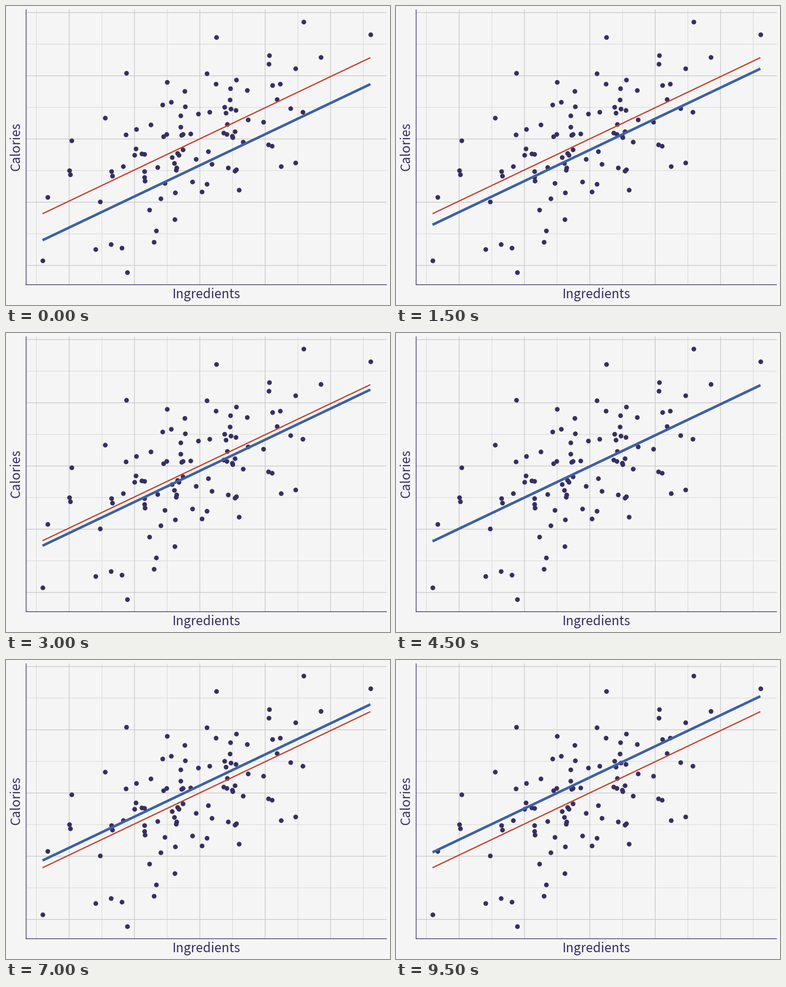
A matplotlib script that plays this animation: 849x660 px, repeating every 10 s.

```python
import matplotlib.pyplot as plt
from matplotlib.animation import FuncAnimation

W, H, DPI = 849, 660, 64
PT = 72 / DPI  # points per pixel

BG, NAVY = "#f5f5f5", "#372f60"
BLUE, RED = "#3d61a4", "#c6432f"
MAJOR, MINOR = "#c8c8c8", "#dedede"
LEFT, RIGHT, TOP, BOTTOM = 44.5, 842, 7.5, 615.3
X0, X1, RISE = 80.8, 805.6, 344.5

LOW_X = [
    (81, 561.5), (92, 422), (145, 296.5), (140, 362.5), (142.3, 371.5),
    (198.5, 536.5), (208.5, 431.5), (219.3, 246.5), (232.3, 526),
    (233, 364.5), (234.8, 374.5), (256, 534), (259, 354), (264.6, 284),
    (266.5, 147.5), (268, 588), (284.3, 328.8), (286.8, 315), (288.2, 272.3),
    (300, 326), (306.5, 326.5), (305.7, 364.5), (305.7, 378), (306.6, 386.3),
    (317.2, 450), (319.6, 261.8), (327, 520.5), (332, 496.3), (334.7, 355.5),
    (341.6, 425), (346.4, 218.2), (348.3, 287.6), (355, 282.8), (351, 390.7),
    (356.5, 167.6), (364.7, 212), (367.4, 334.3), (372.4, 347.3),
    (376.8, 356.5), (375.8, 362), (374, 412), (373.4, 471.3), (379.5, 325.3),
    (382.4, 328.6), (385.6, 241.5), (386.5, 266.5), (388, 285.2),
    (391, 282.7), (391.3, 317), (395, 187.8), (395.8, 221.7),
]
HIGH_X = [
    (408, 281.6), (412.2, 388.4), (419.8, 338.4), (424.7, 238.2),
    (433.3, 410.2), (444, 149), (444.4, 393), (447.2, 321), (450, 234),
    (455.4, 348.8), (464, 172.3), (465.3, 69), (480.8, 280.3), (483.5, 223),
    (485.7, 236.4), (487.6, 282.5), (489, 260.5), (491.4, 356.6),
    (495.4, 206.6), (495.8, 181.6), (496.8, 227.3), (499.8, 287),
    (501.2, 290.3), (506, 276.5), (508.5, 230.2), (509, 162.7), (506, 364),
    (508.7, 361), (515.4, 405.8), (523.7, 299.8), (533.2, 185.6),
    (534.6, 251), (568.8, 255.8), (580.3, 305.5), (588.4, 309.3),
    (581.2, 128), (582.4, 109.2), (588.7, 174.5), (606, 171.8),
    (598.6, 205.6), (607.9, 354.4), (628.8, 225.6), (640, 137.5),
    (640.2, 346), (656.2, 233.7), (658.3, 35), (695.8, 113.3), (805.6, 63.2),
]

# height of the blue line's right end at each step
ENDS = [172.5, 150, 149.6, 138.4, 134, 133.5, 125, 122.5, 120, 115.4,
        111, 109, 109, 107, 98, 97, 95.2, 93, 91.5, 80]

plt.rcParams["font.family"] = "Noto Sans CJK JP"
fig = plt.figure(figsize=(W / DPI, H / DPI), dpi=DPI, facecolor=BG)
ax = fig.add_axes([0, 0, 1, 1])
ax.set(xlim=(0, W), ylim=(H, 0))
ax.axis("off")


def line(xs, ys, color, width, z):
    return ax.plot(xs, ys, color=color, lw=width * PT, zorder=z, snap=False,
                   solid_capstyle="butt")[0]


def label(x, y, text, angle=0):
    ax.text(x, y, text, color=NAVY, size=28.3 * PT, rotation=angle,
            rotation_mode="anchor", ha="center", va="baseline")


def trend(end):
    return [end + RISE, end]


for i in range(11):
    x = 67.3 + 72.25 * i
    major = i % 2
    line([x, x], [TOP, BOTTOM], MAJOR if major else MINOR, 1.5, 1 + major)
for i in range(9):
    y = 14.5 + 69.77 * i
    major = 1 - i % 2
    line([LEFT, RIGHT], [y, y], MAJOR if major else MINOR, 1.5, 1 + major)

ax.scatter(*zip(*(LOW_X + HIGH_X)), s=(10.4 * PT) ** 2, color=NAVY,
           linewidths=0, zorder=3)
line([X0, X1], trend(114), RED, 2.8, 4)
fit = line([X0, X1], trend(ENDS[0]), BLUE, 5.6, 5)
line([LEFT, LEFT], [TOP, BOTTOM + 0.7], NAVY, 1.5, 6)
line([LEFT - 0.7, RIGHT], [BOTTOM, BOTTOM], NAVY, 1.5, 6)

label(442.5, 645.5, "Ingredients")
label(30, 311, "Calories", 90)


def update(i):
    fit.set_ydata(trend(ENDS[i]))
    return [fit]


anim = FuncAnimation(fig, update, frames=len(ENDS), interval=500,
                     repeat=True, repeat_delay=0)
plt.show()
```
